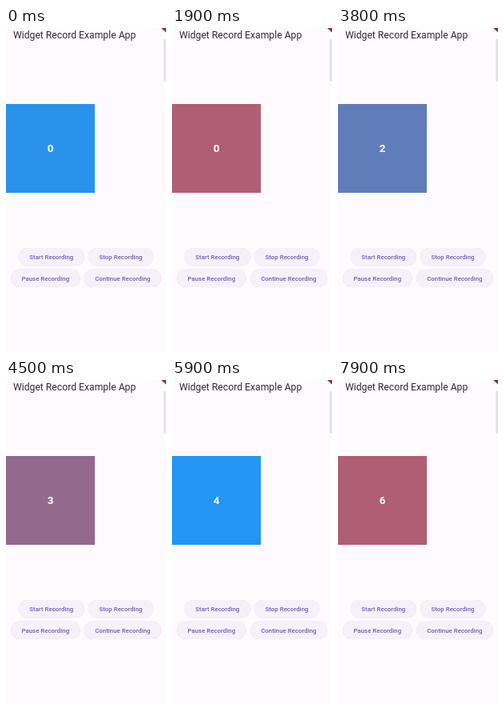
These frames come from a looping animation (200 px wide and 405 px high, 8 s). An HTML page:

```html
<!DOCTYPE html>
<html lang="en">
<head>
<meta charset="utf-8">
<title>Widget Record Example App</title>
<style>
  html, body { margin: 0; width: 100%; height: 100%; overflow: hidden; background: #fffafe; }
  svg { display: block; width: 100vw; height: 100vh; font-family: Roboto, Arial, sans-serif; }
  .title { font-size: 12.2px; fill: #302d32; }
  .count { font-size: 13.4px; font-weight: 700; fill: #fff; text-anchor: middle; }
  .label { font-size: 7.78px; font-weight: 500; letter-spacing: .055px; fill: #735ca8; text-anchor: middle; }
  .pill { fill: #f6f0f9; filter: drop-shadow(0 .6px .6px rgba(0, 0, 0, .2)); }
</style>
</head>
<body>
<svg id="stage" viewBox="0 0 200 405">
  <rect width="200" height="405" fill="#fffafe"/>
  <text class="title" x="8.9" y="13.2">Widget Record Example App</text>
  <path d="M194 0H200V5.5Z" fill="#8a3048"/>
  <rect x="197" y="14" width="3" height="52.5" fill="#e7e2e6"/>
  <rect id="box" x="0" y="95" width="111" height="111"/>
  <text id="count" class="count" x="55.5" y="154.8">0</text>
  <g id="buttons"></g>
</svg>
<script>
const LOOP = 8000, STEP = 100;
const SWEEP = 3000, SWEEP_LEAD = 115;
const FIRST_TICK = 2400, TICK = 1000;
const BLUE = [33, 150, 243], RED = [244, 67, 54];

const byId = id => document.getElementById(id);

function add(parent, tag, attrs, text = '') {
  const node = document.createElementNS('http://www.w3.org/2000/svg', tag);
  for (const key in attrs) node.setAttribute(key, attrs[key]);
  node.textContent = text;
  parent.append(node);
}

function addButton(label, x, y, width) {
  const height = 22.2;
  add(byId('buttons'), 'rect', { class: 'pill', x, y, width, height, rx: height / 2 });
  add(byId('buttons'), 'text', { class: 'label', x: x + width / 2, y: y + 13.8 }, label);
}

addButton('Start Recording', 15.8, 275, 82);
addButton('Stop Recording', 102.8, 275, 81.5);
addButton('Pause Recording', 6, 301.7, 86.6);
addButton('Continue Recording', 97.8, 301.7, 96.2);

function render(time) {
  const t = Math.floor((time % LOOP) / STEP) * STEP;
  // The colour sweeps from blue to red, then snaps back to blue.
  const mix = ((t + SWEEP_LEAD) % SWEEP) / SWEEP;
  const rgb = BLUE.map((v, i) => Math.round(v + (RED[i] - v) * mix));
  byId('box').setAttribute('fill', `rgb(${rgb})`);
  byId('count').textContent = Math.max(0, Math.floor((t - FIRST_TICK) / TICK) + 1);
}

const start = performance.now();
function frame() {
  render(performance.now() - start);
  requestAnimationFrame(frame);
}
frame();
</script>
</body>
</html>
```
